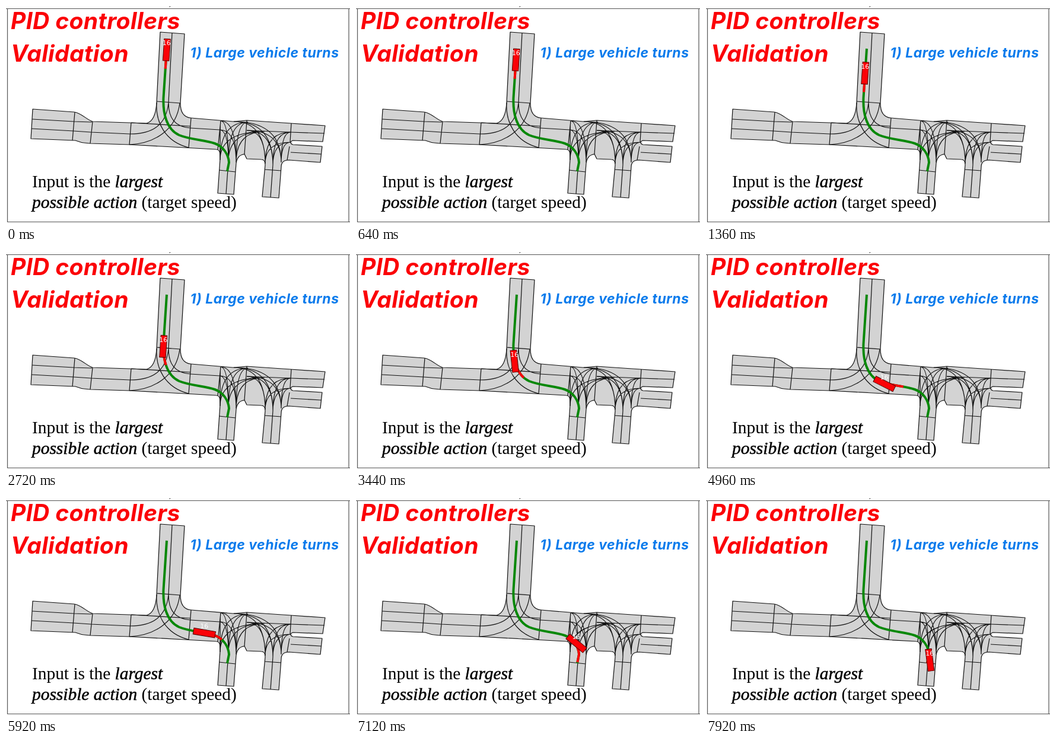
Recreate the animation shown at these times as an HTML page. Size 580x368 px, loop 8 s.

```html
<!DOCTYPE html>
<html lang="en">
<head>
<meta charset="utf-8">
<title>PID controllers validation</title>
<style>
  html, body { margin: 0; width: 100%; height: 100%; overflow: hidden; background: #fff; }
  svg { display: block; width: 580px; height: 368px; }
  .head { font-family: Inter, "Open Sans", sans-serif; font-weight: 700; font-style: italic; font-feature-settings: "cv11"; }
  .big { font-size: 39px; letter-spacing: .4px; fill: #fb0207; }
  .sub { font-size: 23px; letter-spacing: .5px; fill: #0a7bec; }
  .note { font: 29.4px "Liberation Serif", serif; fill: #000; }
  .note tspan { font-style: italic; stroke: #000; stroke-width: .5px; }
  .tag { font: 11px "DejaVu Sans", sans-serif; fill: #fff; text-anchor: middle; }
  .lane { fill: none; stroke: #111; stroke-width: 1.2; }
</style>
</head>
<body>
<svg viewBox="0 0 580 368">
  <rect width="580" height="368" fill="#fff"/>
  <path d="M0 4.5H580M2.5 4V364.5H580M578 4V364" fill="none" stroke="#555" stroke-width="1.2"/>
  <path d="M277 0L275.5 2" stroke="#333"/>

  <path fill="#d3d3d3" stroke="#111" stroke-width="1.2" stroke-linejoin="round" d="M260 44L301 47L294 164
    C294 178 299 188 312 189L383 195L406 193L480 198L538 202L534 229L484 227
    C479 228 479 233 484 234L533 237L530 264L477 260C468 260 464 265 464 272
    L460 324L432 322L437 268C437 262 435 259 430 259L406 258L402 250
    C394 251 389 257 388 266L384 318L357 316L361 258C361 248 361 242 354 242
    L300 239L208 234L142 232L132 231C126 231 122 228 117 227L42 224L45 174
    L115 179C126 180 136 192 146 195L237 198C248 195 253 181 254 163Z"/>

  <g class="lane">
    <!-- lane dividers -->
    <path d="M280 46L274 163M44 191L114 195L145 196M43 207L114 211L143 213L209 216
      M311 206L360 209M375 262L371 317M450 268L446 323M406 210L480 213L537 215M480 247L531 250"/>
    <!-- segment ends -->
    <path d="M254 161L294 164M116 179L112 227M146 195L142 232M211 197L208 234M312 189L308 239
      M362 194L357 242M359 277L387 280M436 276L464 278M406 193L402 250M481 198L479 230M478 237L474 260"/>
    <!-- left junction -->
    <path d="M209 216C245 216 270 203 274 163M208 234C250 232 287 210 293 164
      M254 163C252 196 268 229 308 239M274 163C274 190 285 204 311 206M211 197L311 203"/>
    <path id="turns"/>
  </g>

  <path id="route" fill="none" stroke="#078807" stroke-width="4"
    d="M271 72L265.5 155C264.5 180 270 208 292 218C312 226 335 226 352 232C366 237 375 250 376 264L373 279"/>
  <path id="ahead" fill="none" stroke="#fb0207" stroke-width="4"/>
  <rect id="car" x="-18.5" y="-5.25" width="37" height="10.5" fill="#fb0207" stroke="#500" stroke-width="1"/>
  <text id="tag" class="tag">16</text>

  <text class="head big" x="8" y="39">PID controllers</text>
  <text class="head big" x="8" y="94">Validation</text>
  <text class="head sub" x="310.5" y="87">1) Large vehicle turns</text>
  <text class="note" x="44" y="306">Input is the <tspan>largest</tspan></text>
  <text class="note" x="44" y="341"><tspan>possible action</tspan> (target speed)</text>
</svg>
<script>
  const LOOP = 8000, STEP = 80;
  const SPEED = 0.035, RAMP = 800, LAG = 10;  // px per ms, ms, px lost while speeding up
  const AXLE = 12, REACH = 32;                // rear point to centre, look-ahead
  const $ = id => document.getElementById(id);
  const route = $('route'), ahead = $('ahead'), car = $('car'), tag = $('tag');
  const length = route.getTotalLength();

  // Every side lane of a junction bends into every lane of its southern arm
  function turns(sides, south) {
    return sides.flatMap(([x, y]) =>
      south.map(([sx, sy]) => `M${x} ${y}Q${sx} ${y} ${sx} ${sy}`)).join('');
  }
  $('turns').setAttribute('d',
    turns([[362, 194], [360, 209], [408, 196], [436, 212]], [[361, 260], [375, 262], [388, 264]]) +
    turns([[384, 195], [406, 210], [480, 213], [480, 230]], [[437, 266], [450, 268], [464, 264]]));

  const travelled = t => 2 + SPEED * t - LAG * (1 - Math.exp(-t / RAMP));

  // The rear point holds the route; the body extends straight from it
  function poseAt(s) {
    const rear = Math.max(s - AXLE, 0);
    const a = route.getPointAtLength(rear), b = route.getPointAtLength(rear + 1);
    const angle = Math.atan2(b.y - a.y, b.x - a.x), d = s - rear;
    return { x: a.x + d * Math.cos(angle), y: a.y + d * Math.sin(angle), angle: angle * 180 / Math.PI };
  }

  function routePart(from, to) {
    let d = '';
    for (let s = from; s < to + 1; s++) {
      const p = route.getPointAtLength(Math.min(s, to));
      d += (d ? 'L' : 'M') + p.x + ' ' + p.y;
    }
    return d;
  }

  function draw(ms) {
    const s = travelled(Math.floor(ms % LOOP / STEP) * STEP);
    const { x, y, angle } = poseAt(s);
    ahead.setAttribute('d', routePart(s, Math.min(s + REACH, length)));
    car.setAttribute('transform', `translate(${x} ${y}) rotate(${angle})`);
    tag.setAttribute('x', x);
    tag.setAttribute('y', y - 7.5);
  }

  const start = performance.now();
  function tick() {
    draw(performance.now() - start);
    requestAnimationFrame(tick);
  }
  tick();
</script>
</body>
</html>
```
